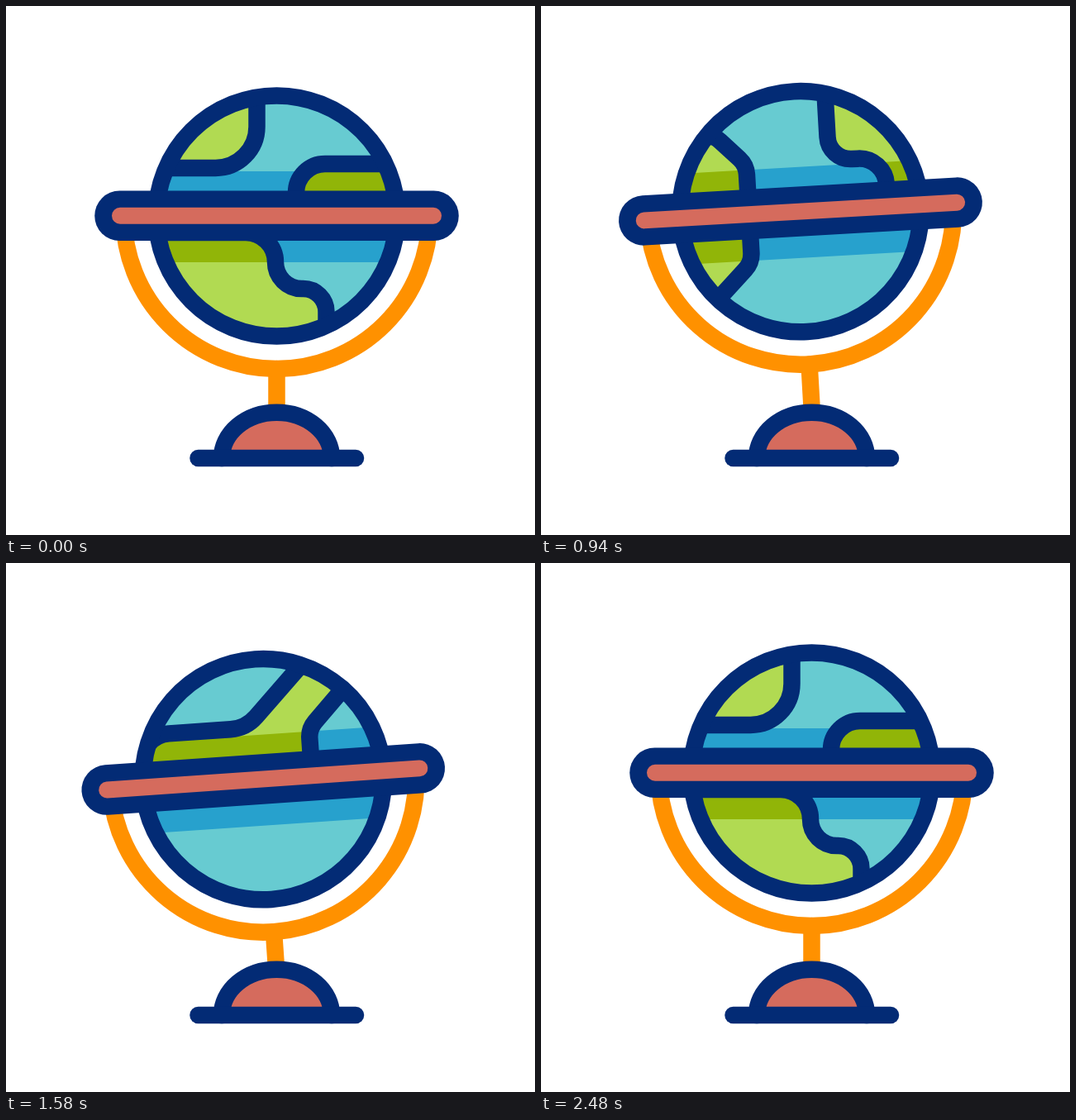
These frames come from a looping animation (640 px wide and 640 px high, 2.7 s). An HTML page with a canvas:

```html
<!DOCTYPE html>
<html lang="en">
<head>
<meta charset="utf-8">
<title>Spinning globe</title>
<style>
  html, body { margin: 0; width: 100%; height: 100%; overflow: hidden; background: #fff; }
  canvas { display: block; width: 640px; height: 640px; }
</style>
</head>
<body>
<canvas id="stage" width="640" height="640"></canvas>
<script>
const ctx = document.getElementById('stage').getContext('2d');
const NAVY = '#032b75', RED = '#d56b5d', ORANGE = '#ff9100', YELLOW = '#ffcc50';
const WATER = ['#67cbd1', '#27a1cd'], LAND = ['#b1da52', '#91b508'];
const LOOP = 2700, START = 220, END = 2380;
const LINE = 20.5, MAP_WIDTH = 1240, CORNER = 28;
const CX = 327.5, CY = 254, PIVOT = 490;

// Eased progress from 0 to 1 between two times.
function ease(t, from, to) {
  const u = Math.min(1, Math.max(0, (t - from) / (to - from)));
  return u * u * (3 - 2 * u);
}

const wave = (t, peak, period) => Math.cos(2 * Math.PI * (t - peak) / period);

const tilt = t => 4.05 * wave(t, 715, 564) * ease(t, START, 715) * (1 - ease(t, 1843, END));

// The bounce quickens once it starts to settle at its highest point.
function bob(t) {
  const settle = 1943;
  return t < settle
    ? 13 * wave(t, 1118, 550) * ease(t, START, 568)
    : -13 * wave(t, settle, 364) * (1 - ease(t, settle, END));
}

// One turn of the map, slightly overshot and drawn back.
const spin = t => MAP_WIDTH - (MAP_WIDTH + 6) * ease(t, START, 2000) + 6 * ease(t, 2000, END);

// Closed polygon of [x, y, corner radius] points.
function rounded(points) {
  const path = new Path2D(), n = points.length, last = points[n - 1];
  path.moveTo((last[0] + points[0][0]) / 2, (last[1] + points[0][1]) / 2);
  points.forEach(([x, y, r = CORNER], i) => {
    const next = points[(i + 1) % n];
    path.arcTo(x, y, next[0], next[1], r);
  });
  path.closePath();
  return path;
}

// Continents on the unrolled map, y measured from the equator.
const lands = [
  [[-24, -200], [-24, -58, 50], [-244, -58, 33], [-244, 0], [-342, 0], [-342, -60, 33], [-410, -60], [-410, -200]],
  [[-211, 20], [-251, 60], [-251, 122], [-305, 122], [-305, 190], [60, 190], [60, 88], [-1.5, 88, 32], [-1.5, 20, 36]],
  [[23.5, 0], [23.5, -63, 35], [152, -63, 45], [275, -186, 0], [275, -105], [228, -57], [228, 0]],
  [[350, -62, 35], [404, -62], [480, -138], [480, 64], [394, 64], [350, 20]],
  [[480, -20], [598, -20, 22], [598, -58], [639, -99], [692, -99], [730, -60], [730, 58], [687, 100], [583, 100], [543, 59], [480, 59]]
].map(rounded);

const swoosh = new Path2D('M146 200C96 207 67 228 67 250C67 298 186 337 332 337C478 337 596 298 596 250C596 228 568 207 516 200');
const SWOOSH_LENGTH = 790;

function stroke(color, width, path) {
  ctx.strokeStyle = color;
  ctx.lineWidth = width;
  path ? ctx.stroke(path) : ctx.stroke();
}

function line(x1, y1, x2, y2, color, width) {
  ctx.beginPath();
  ctx.moveTo(x1, y1);
  ctx.lineTo(x2, y2);
  stroke(color, width);
}

function arc(radius, from, to, color) {
  ctx.beginPath();
  ctx.arc(0, 0, radius, from, to);
  stroke(color, LINE);
}

function shaded(x, width, [light, dark]) {
  ctx.fillStyle = light;
  ctx.fillRect(x, -210, width, 420);
  ctx.fillStyle = dark;
  ctx.fillRect(x, -54, width, 110);
}

function drawMap(shift) {
  ctx.save();
  ctx.beginPath();
  ctx.arc(0, 0, 146, 0, 2 * Math.PI);
  ctx.clip();
  shaded(-150, 300, WATER);
  for (const offset of [0, MAP_WIDTH]) {
    ctx.save();
    ctx.translate(offset - shift, 0);
    for (const land of lands) {
      ctx.save();
      ctx.clip(land);
      shaded(-MAP_WIDTH, 2 * MAP_WIDTH, LAND);
      ctx.restore();
      stroke(NAVY, LINE, land);
    }
    ctx.restore();
  }
  ctx.restore();
}

function drawGlobe(t) {
  ctx.save();
  ctx.translate(CX, PIVOT + bob(t));
  ctx.rotate(tilt(t) * Math.PI / 180);
  ctx.translate(0, CY - PIVOT);
  line(0, 185, 0, 262, ORANGE, LINE);
  arc(185, 0, Math.PI, ORANGE);
  drawMap(spin(t));
  arc(145.6, 0, 2 * Math.PI, NAVY);
  line(-190, -.2, 190, -.2, NAVY, 60.5);
  line(-189.5, -.2, 189.5, -.2, RED, 20);
  ctx.restore();
}

function drawBase() {
  ctx.beginPath();
  ctx.ellipse(CX, 547, 66.5, 55.3, 0, Math.PI, 2 * Math.PI);
  ctx.fillStyle = RED;
  ctx.fill();
  stroke(NAVY, LINE);
  line(232.5, 547, 423, 547, NAVY, LINE);
}

function drawSwoosh(t) {
  const head = ease(t, 440, 720), tail = ease(t, 600, 843);
  if (head <= tail) return;
  const reach = head < 1 ? head : 1.1;
  ctx.setLineDash([(reach - tail) * SWOOSH_LENGTH, 2 * SWOOSH_LENGTH]);
  ctx.lineDashOffset = -tail * SWOOSH_LENGTH;
  stroke(YELLOW, LINE, swoosh);
  ctx.setLineDash([]);
}

function draw() {
  const t = performance.now() % LOOP;
  ctx.clearRect(0, 0, 640, 640);
  ctx.lineCap = ctx.lineJoin = 'round';
  drawGlobe(t);
  drawBase();
  drawSwoosh(t);
  requestAnimationFrame(draw);
}
draw();
</script>
</body>
</html>
```
